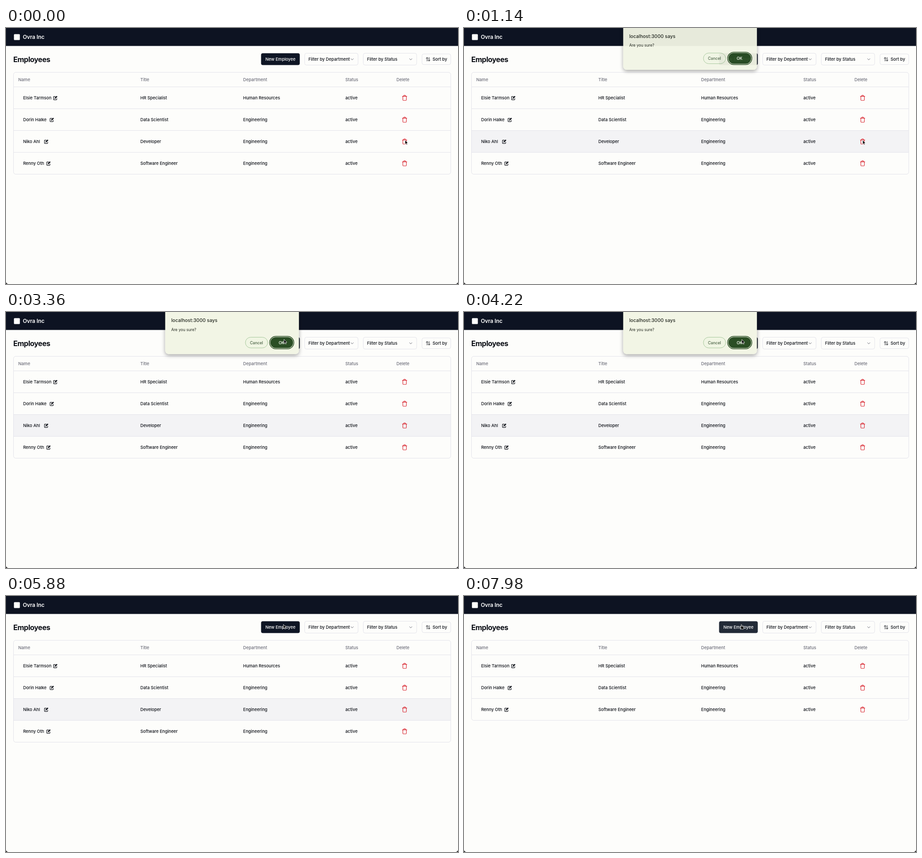
An HTML page for the animation above (8000 ms loop, 995 px wide and 563 px high).

```html
<!DOCTYPE html>
<html lang="en">
<head>
<meta charset="utf-8">
<title>Employees</title>
<style>
  html, body { margin: 0; width: 100%; height: 100%; overflow: hidden; background: #000; }
  svg { display: block; width: 100%; height: 100%; font: 500 9.33px Inter, sans-serif; fill: #0c0f16; }
  .head { fill: #6b6c78; }
  .line { fill: none; stroke: #e3e3ea; }
  .icon { fill: none; stroke-linecap: round; stroke-linejoin: round; }
  .mid { text-anchor: middle; }
</style>
</head>
<body>
<svg viewBox="0 0 995 563" preserveAspectRatio="none">
  <defs>
    <g id="trash" class="icon" stroke="#d8202a" stroke-width="2">
      <path d="M3 6h18M19 6v14a2 2 0 0 1-2 2H7a2 2 0 0 1-2-2V6M8 6V4a2 2 0 0 1 2-2h4a2 2 0 0 1 2 2v2"/>
    </g>
    <g id="edit">
      <path class="icon" stroke="#0c0f16" stroke-width="1.1" d="M5 1.5H1.4a.8 .8 0 0 0-.8 .8V8a.8 .8 0 0 0 .8 .8H7a.8 .8 0 0 0 .8-.8V5.8"/>
      <path d="M7.5 .2 9.2 1.9 4.9 6.2 2.8 6.6 3.2 4.5Z"/>
    </g>
    <path id="chevron" class="icon" stroke="#6d6f78" d="M-2.7-1.4 0 1.4 2.7-1.4"/>
    <filter id="shadow" x="-20%" y="-20%" width="140%" height="150%">
      <feDropShadow dx="0" dy="3" stdDeviation="4.5" flood-color="#000" flood-opacity=".36"/>
    </filter>
  </defs>

  <path fill="#fdfdfb" d="M0 0H995V558a5 5 0 0 1-5 5H5a5 5 0 0 1-5-5Z"/>
  <rect width="995" height="39.5" fill="#0d1322"/>
  <rect x="17.5" y="13.5" width="13" height="13" rx="1.5" fill="#fff"/>
  <text x="37" y="24.2" font-size="12" font-weight="600" fill="#fff" letter-spacing="-.1">Ovra Inc</text>
  <text x="16" y="74.7" font-size="16" font-weight="700" letter-spacing="-.5">Employees</text>

  <rect id="add" x="561.5" y="55.5" width="85.2" height="26" rx="4"/>
  <text class="mid" x="604" y="72" fill="#fff">New Employee</text>
  <g class="line">
    <rect x="657.5" y="55.5" width="117.5" height="26" rx="4"/>
    <rect x="786.5" y="55.5" width="117.5" height="26" rx="4"/>
    <rect x="915.8" y="57" width="63.2" height="23.5" rx="4"/>
  </g>
  <text x="665.7" y="72">Filter by Department</text>
  <text x="794.7" y="72">Filter by Status</text>
  <text x="939" y="72">Sort by</text>
  <use href="#chevron" x="762" y="68.8"/>
  <use href="#chevron" x="891" y="68.8"/>
  <path class="icon" stroke="#0c0f16" d="M927 72.8V64.8M924.8 67 927 64.8 929.2 67M931.3 64.8V72.8M929.1 70.6 931.3 72.8 933.5 70.6"/>

  <g id="table"></g>

  <g id="dialog">
    <rect x="350.5" y="-14" width="294.3" height="106.5" rx="8" fill="#f2f5e5" filter="url(#shadow)"/>
    <text x="363.7" y="22.4" font-size="10.5" fill="#22271f">localhost:3000 says</text>
    <text x="363.7" y="41.6" font-size="8.5" font-weight="400" fill="#22271f">Are you sure?</text>
    <rect x="527" y="55.5" width="49" height="23.5" rx="11.75" fill="#f0f5e3" stroke="#a5c79b"/>
    <text class="mid" x="551.3" y="70.5" font-size="8.67" fill="#486043">Cancel</text>
    <rect id="ring" x="580.3" y="53.6" width="53.4" height="27.4" rx="13.7" fill="none" stroke="#2a4e24" stroke-width="1.5"/>
    <rect id="ok" x="582" y="55.3" width="50" height="24" rx="12"/>
    <text class="mid" x="606.6" y="70.5" font-size="8.67" font-weight="600" fill="#f1f6ec">OK</text>
  </g>

  <g id="cursor" stroke="#fff" stroke-width=".8" stroke-linejoin="round" fill="#000">
    <path id="arrow" d="M0 0V9.2L2.1 7.3 3.5 10.6 5 9.9 3.6 6.7H6.4Z"/>
    <path id="hand" d="M-.8 .6a.9 .9 0 0 1 1.8 0V3.6L4.4 4.3a1.3 1.3 0 0 1 1 1.3C5.4 7.6 4.8 8.4 4.5 10H.2C-.4 8.5-2 7.3-2.5 6.1c-.2-.7 .7-1.2 1.2-.7l.5 .5Z"/>
  </g>
</svg>
<script>
  const LOOP = 8000, REMOVED = 5960, LEAVE = 6240;
  const $ = id => document.getElementById(id);
  const clamp = v => Math.max(0, Math.min(1, v));
  const ramp = (t, a, b) => clamp((t - a) / (b - a));
  const smooth = p => p * p * (3 - 2 * p);
  const set = (id, attrs) => {
    for (const k in attrs) $(id).setAttribute(k, attrs[k]);
  };
  const mix = (a, b, p) => `rgb(${a.map((v, i) => Math.round(v + (b[i] - v) * p))})`;

  // name, edit icon x, title, department
  const people = [
    ['Elsie Tarmson', 104, 'HR Specialist', 'Human Resources'],
    ['Dorin Halke', 96.3, 'Data Scientist', 'Engineering'],
    ['Niko Ahl', 84, 'Developer', 'Engineering'],
    ['Renny Oth', 89, 'Software Engineer', 'Engineering']
  ];
  const columns = [[27, 'Name'], [295.8, 'Title'], [522, 'Department'], [747, 'Status'], [859.5, 'Delete']];
  const label = (x, y, s, cls = '') => `<text x="${x}" y="${y}" class="${cls}">${s}</text>`;

  const row = ([name, editX, title, dept], i) => `<g id="row${i}">
    ${label(37.7, 27.6, name)}<use href="#edit" x="${editX}" y="19.6"/>
    ${label(295.8, 27.6, title)}${label(522, 27.6, dept)}${label(747, 27.6, 'active')}
    <use href="#trash" transform="translate(870.8 17.5) scale(.555)"/></g>`;

  $('table').innerHTML =
    '<rect id="hover" x="17" y="226" width="962" height="47.5" fill="#f3f3f5"/>' +
    '<rect id="frame" class="line" x="16.5" y="97.5" width="962.5" rx="5"/>' +
    [0, 1, 2, 3].map(i => `<path id="rule${i}" class="line" d="M17 ${129.5 + 48 * i}H979"/>`).join('') +
    columns.map(([x, s]) => label(x, 117.3, s, 'head')).join('') +
    people.map(row).join('');

  // time, x, y of the pointer tip
  const path = [
    [0, 878.5, 246.5], [300, 877.6, 246.5], [1720, 877.6, 246.5], [2400, 664, 46], [2500, 664, 46],
    [3050, 612, 60], [4220, 611.6, 60.3], [5000, 610.6, 62], [6200, 610.6, 62.5], [LOOP, 610.6, 63]
  ];
  function pointer(t) {
    const i = path.findIndex(p => p[0] > t);
    const [t0, x0, y0] = path[i - 1], [t1, x1, y1] = path[i];
    const p = smooth(ramp(t, t0, t1));
    return [x0 + (x1 - x0) * p, y0 + (y1 - y0) * p];
  }

  function draw(t) {
    const removed = t >= REMOVED;
    people.forEach((_, i) => {
      const slot = removed && i > 2 ? i - 1 : i;
      set('row' + i, {
        transform: `translate(0 ${129.5 + 48 * slot})`,
        visibility: removed && i === 2 ? 'hidden' : 'visible'
      });
    });
    set('frame', { height: removed ? 176 : 224 });
    set('rule3', { visibility: removed ? 'hidden' : 'visible' });
    set('hover', { opacity: ramp(t, 20, 170) * (1 - ramp(t, LEAVE + 20, LEAVE + 170)) });
    set('add', { fill: mix([14, 21, 36], [34, 42, 55], ramp(t, LEAVE, LEAVE + 150)) });

    const opening = 1 - (1 - ramp(t, 1000, 1180)) ** 2;
    const closing = ramp(t, 5575, 5775) ** 2;
    const shown = opening * (1 - closing);
    const pressed = t >= 5540;
    set('dialog', { opacity: shown, transform: `translate(0 ${(shown - 1) * 10})` });
    set('ring', { visibility: pressed ? 'hidden' : 'inherit' });
    set('ok', { fill: pressed ? '#3e6937' : '#2a4e24' });

    const overButton = t >= LEAVE;
    set('cursor', { transform: `translate(${pointer(t)})` });
    set('arrow', { visibility: overButton ? 'hidden' : 'visible' });
    set('hand', { visibility: overButton ? 'visible' : 'hidden' });
  }

  const start = performance.now();
  function tick() {
    draw((performance.now() - start) % LOOP);
    requestAnimationFrame(tick);
  }
  tick();
</script>
</body>
</html>
```
